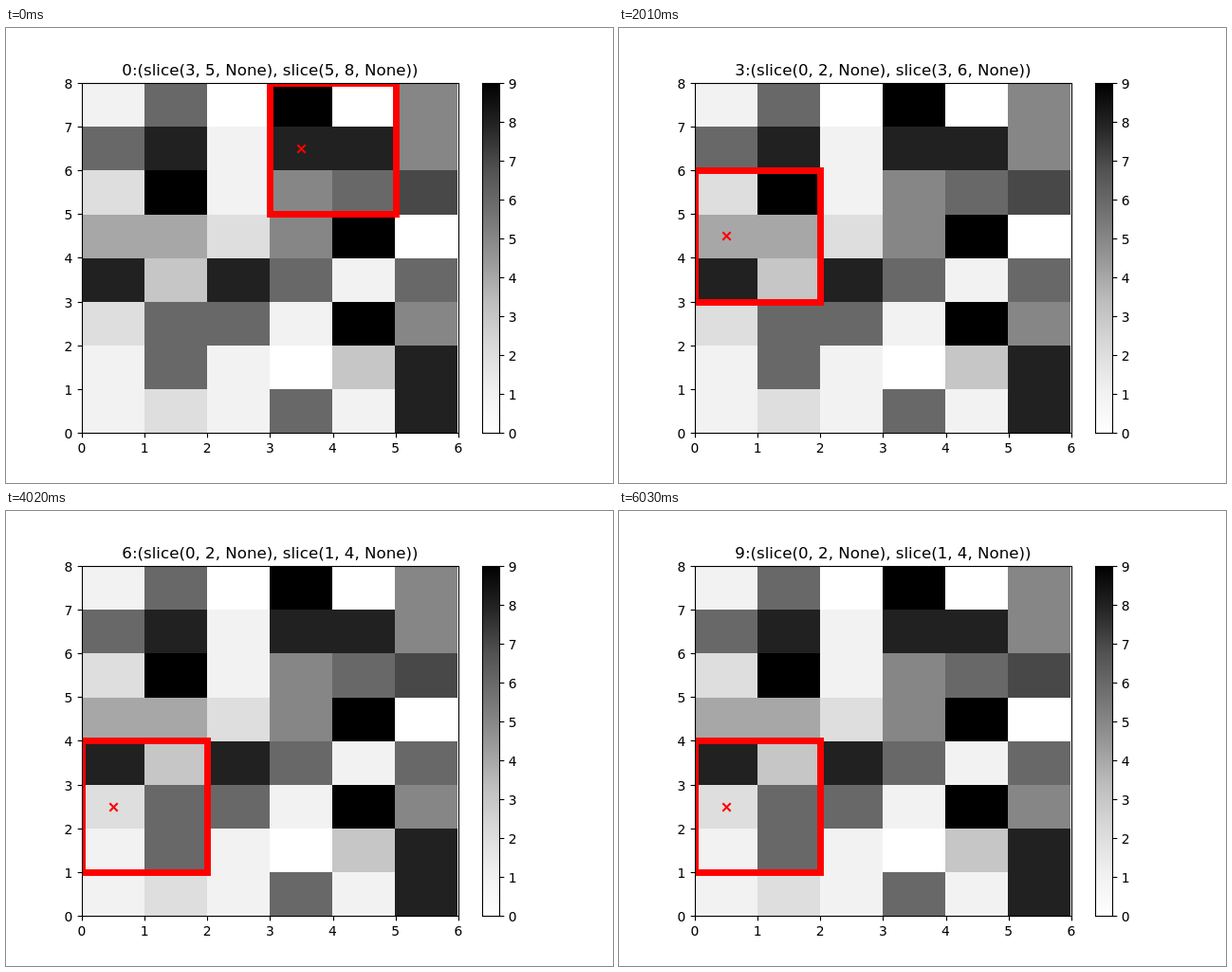
An HTML page with a canvas that plays this animation: 640 px wide and 480 px high, repeating every 6.7 s.

```html
<!DOCTYPE html>
<html lang="en">
<head>
<meta charset="utf-8">
<title>Sliding window heat map</title>
<style>
  html, body { margin: 0; width: 100%; height: 100%; overflow: hidden; background: #fff; }
  canvas { display: block; }
</style>
</head>
<body>
<canvas id="stage" width="640" height="480"></canvas>
<script>
const ctx = document.getElementById('stage').getContext('2d');

const STEP = 670;
const LEFT = 80, RIGHT = 476.8, TOP = 57.6, BOTTOM = 427.2;
const CELL_W = 66.1333, CELL_H = 46.2;
const BAR = { left: 501.6, right: 520.08 };
const POINT = 100 / 72;
const TICK = 3.5 * POINT, THIN = 0.8 * POINT;

// Heat map values, top row first.
const ROWS = ['160905', '681885', '291567', '442590', '838616', '266195', '161038', '121618'];

// Lower left corner of the 2 x 3 window in each step.
const WINDOWS = [[3, 5], [3, 5], [4, 0], [0, 3], [4, 3], [1, 5], [0, 1], [4, 1], [0, 3], [0, 1]];

const GREYS = [255, 240, 217, 189, 150, 115, 82, 37, 0];

function grey(t) {
  const i = Math.min(7, Math.floor(t * 8));
  const level = Math.round(GREYS[i] + (GREYS[i + 1] - GREYS[i]) * (t * 8 - i));
  return `rgb(${level},${level},${level})`;
}

const snap = v => Math.floor(v + 0.5) + 0.5;
const dataX = x => LEFT + x * CELL_W;
const dataY = y => BOTTOM - y * CELL_H;

function line(x1, y1, x2, y2) {
  ctx.beginPath();
  ctx.moveTo(x1, y1);
  ctx.lineTo(x2, y2);
  ctx.stroke();
}

function frame(left, top, right, bottom) {
  const x = snap(left), y = snap(top);
  ctx.strokeRect(x, y, snap(right) - x, snap(bottom) - y);
}

function text(string, x, y, align, size) {
  ctx.font = `${size * POINT}px "DejaVu Sans", sans-serif`;
  ctx.textAlign = align;
  ctx.fillStyle = '#000';
  ctx.fillText(string, x, y);
}

function drawCells() {
  const colEdge = c => Math.floor(dataX(c));
  const rowEdge = r => Math.ceil(TOP + r * CELL_H - 0.001);
  ROWS.forEach((row, r) => [...row].forEach((value, c) => {
    ctx.fillStyle = grey(value / 9);
    ctx.fillRect(colEdge(c), rowEdge(r),
      colEdge(c + 1) - colEdge(c), rowEdge(r + 1) - rowEdge(r));
  }));
}

function drawColorBar() {
  const gradient = ctx.createLinearGradient(0, BOTTOM, 0, TOP);
  GREYS.forEach((_, i) => gradient.addColorStop(i / 8, grey(i / 8)));
  ctx.fillStyle = gradient;
  ctx.fillRect(502, 58, 18, 369);
}

function drawWindow([x, y]) {
  ctx.save();
  ctx.beginPath();
  ctx.rect(80, 58, 397, 370);
  ctx.clip();
  ctx.strokeStyle = '#f00';
  ctx.lineWidth = 5 * POINT;
  frame(dataX(x), dataY(y + 3), dataX(x + 2), dataY(y));

  const cx = snap(dataX(x + 0.5)), cy = snap(dataY(y + 1.5)), r = 3 * POINT;
  ctx.lineWidth = 1.5 * POINT;
  line(cx - r, cy - r, cx + r, cy + r);
  line(cx - r, cy + r, cx + r, cy - r);
  ctx.restore();
}

function drawAxes() {
  ctx.strokeStyle = '#000';
  ctx.lineWidth = THIN;
  frame(LEFT, TOP, RIGHT, BOTTOM);
  frame(BAR.left, TOP, BAR.right, BOTTOM);

  for (let i = 0; i <= 6; i++) {
    const x = snap(dataX(i));
    line(x, 427.5, x, 427.5 + TICK);
    text(i, dataX(i), 448, 'center', 10);
  }
  for (let i = 0; i <= 8; i++) {
    const y = snap(dataY(i));
    line(80.5, y, 80.5 - TICK, y);
    text(i, LEFT - 2 * TICK, y + 5.5, 'right', 10);
  }
  for (let i = 0; i <= 9; i++) {
    const y = snap(BOTTOM - (BOTTOM - TOP) * i / 9);
    line(520.5, y, 520.5 + TICK, y);
    text(i, BAR.right + 2 * TICK, y + 5.5, 'left', 10);
  }
}

function draw(now) {
  const step = Math.floor(now / STEP) % WINDOWS.length;
  const [x, y] = WINDOWS[step];
  ctx.fillStyle = '#fff';
  ctx.fillRect(0, 0, 640, 480);
  drawCells();
  drawColorBar();
  drawWindow(WINDOWS[step]);
  drawAxes();
  text(`${step}:(slice(${x}, ${x + 2}, None), slice(${y}, ${y + 3}, None))`,
    (LEFT + RIGHT) / 2, 50, 'center', 12);
}

const start = performance.now();
function tick() {
  draw(performance.now() - start);
  requestAnimationFrame(tick);
}
tick();
</script>
</body>
</html>
```
